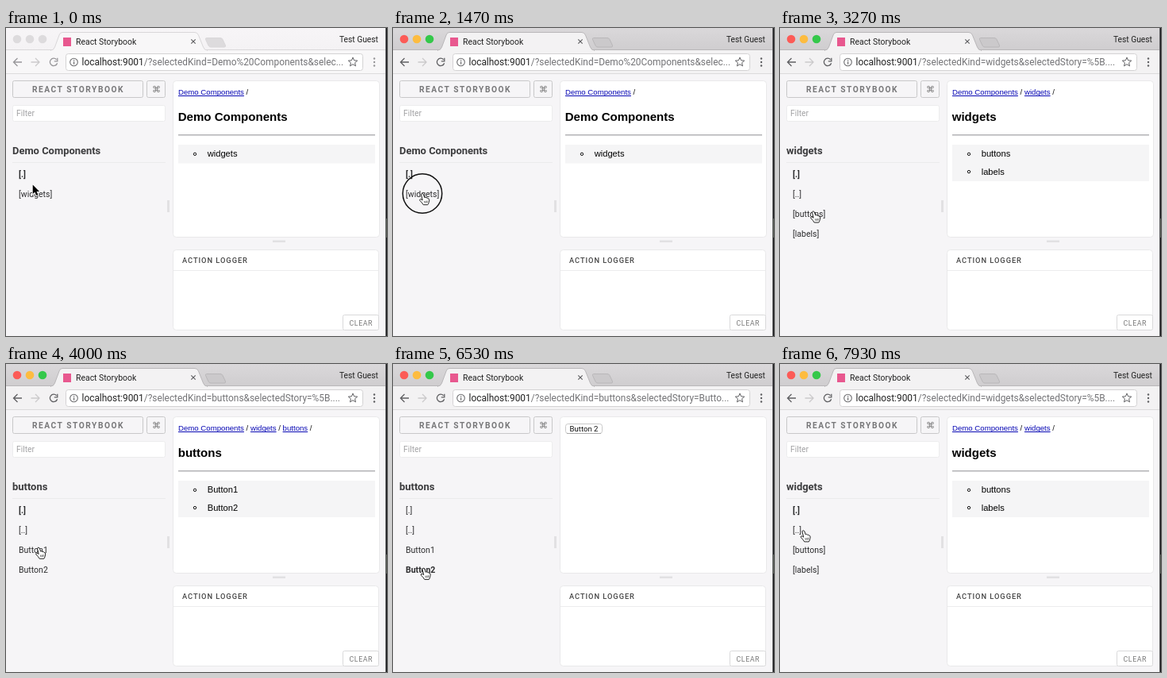
An HTML page with a canvas for the animation above (8000 ms loop, 480 by 388 pixels).

```html
<!DOCTYPE html>
<html lang="en">
<head>
<meta charset="utf-8">
<title>React Storybook</title>
<style>
html, body { margin: 0; width: 480px; height: 388px; overflow: hidden; background: #f6f5f7; }
canvas { display: block; }
</style>
</head>
<body>
<canvas id="stage" width="480" height="388"></canvas>
<script>
const ctx = document.getElementById('stage').getContext('2d');
const LOOP = 8000;
const UI = 'Roboto, "DejaVu Sans", sans-serif';
const DOC = '"Liberation Sans", Arial, sans-serif';
const PATH = '/?selectedKind=';

// Window colours with and without focus
const FOCUS_AT = 70;
const idle = {
  top: '#f7f5f7', low: '#f4f2f4', line: '#d9d7d9', tab: '#f8f7f8',
  plus: '#dddbdd', icon: '#98979a', lights: ['#dddbdd', '#dddbdd', '#dddbdd']
};
const active = {
  top: '#dad8da', low: '#cfcdcf', line: '#b9b7b9', tab: '#f3f2f3',
  plus: '#cbc9cb', icon: '#606063', lights: ['#fc5b57', '#fdbc40', '#34c84a']
};

// Each page: sidebar, selected item, address and preview
const root = {
  title: 'Demo Components', items: ['[.]', '[widgets]'], on: 0,
  url: 'Demo%20Components&selec...', crumbs: ['Demo Components'], list: ['widgets']
};
const widgets = {
  title: 'widgets', items: ['[.]', '[..]', '[buttons]', '[labels]'], on: 0,
  url: 'widgets&selectedStory=%5B....', crumbs: ['Demo Components', 'widgets'], list: ['buttons', 'labels']
};
const buttons = {
  title: 'buttons', items: ['[.]', '[..]', 'Button1', 'Button2'], on: 0,
  url: 'buttons&selectedStory=%5B....', crumbs: ['Demo Components', 'widgets', 'buttons'], list: ['Button1', 'Button2']
};
const story = n => ({ ...buttons, on: n + 1, url: 'buttons&selectedStory=Butto...', button: 'Button ' + n });
const pages = [[0, root], [1670, widgets], [3530, buttons], [4470, story(1)], [6270, story(2)], [7340, widgets]];

const presses = [1470, 3330, 4270, 6070, 7130];
const HOLD = 140;
const moves = [
  [0, 33.7, 197.5], [200, 33.7, 197.5], [870, 37, 208.5], [2330, 37, 208.5], [2730, 42, 230.8],
  [3800, 42, 230.8], [4130, 40.5, 231.2], [5470, 40.5, 231.2], [5870, 38.5, 257.2],
  [6670, 38.5, 257.2], [7000, 29.5, 209.7], [8000, 29.5, 209.7]
];

const arrow = new Path2D('M0 0V11.6L2.7 9.2L4.7 13.6L6.7 12.7L4.8 8.5H8.4Z');
const hand = new Path2D('M-1.6 1Q-.2-1 1.4 1L2.6 5Q4 4 5 5.4Q6.4 4.8 7 6.4Q8.5 6.2 8.7 8L8.2 11Q7.7 13 6.8 14.2H1.2Q-.4 11.4-3 9Q-4 7.5-2.5 7.1Q-1 7.3 .2 8.4Z');
const knuckles = new Path2D('M2.4 9.5L2.9 12M4.3 9.3L4.6 12M6.1 9L6.2 11.8');

function text(s, x, y, size, color, font = UI, weight = 400, gap = 0) {
  ctx.font = `${weight} ${size}px ${font}`;
  ctx.letterSpacing = gap + 'px';
  ctx.fillStyle = color;
  ctx.fillText(s, x, y);
  return x + ctx.measureText(s).width;
}

function rect(x, y, w, h, color) {
  ctx.fillStyle = color;
  ctx.fillRect(x, y, w, h);
}

function box(x, y, w, h, r, fill, stroke) {
  ctx.beginPath();
  ctx.roundRect(x + .5, y + .5, w - 1, h - 1, r);
  ctx.fillStyle = fill;
  ctx.fill();
  ctx.lineWidth = 1;
  ctx.strokeStyle = stroke;
  ctx.stroke();
}

function path(d, stroke, width = 1, fill) {
  const p = new Path2D(d);
  if (fill) { ctx.fillStyle = fill; ctx.fill(p); }
  ctx.strokeStyle = stroke;
  ctx.lineWidth = width;
  ctx.stroke(p);
}

function disc(x, y, r, fill) {
  ctx.beginPath();
  ctx.arc(x, y, r, 0, 7);
  ctx.fillStyle = fill;
  ctx.fill();
}

function ring(x, y, r, color, width) {
  ctx.beginPath();
  ctx.arc(x, y, r, 0, 7);
  ctx.strokeStyle = color;
  ctx.lineWidth = width;
  ctx.stroke();
}

function star(x, y, r, color) {
  ctx.beginPath();
  for (let i = 0; i < 10; i++) {
    const a = i * Math.PI / 5 - Math.PI / 2, d = i % 2 ? r * .45 : r;
    ctx.lineTo(x + d * Math.cos(a), y + d * Math.sin(a));
  }
  ctx.closePath();
  ctx.strokeStyle = color;
  ctx.lineWidth = 1;
  ctx.stroke();
}

function browser(page, look) {
  const strip = ctx.createLinearGradient(0, 0, 0, 28);
  strip.addColorStop(0, look.top);
  strip.addColorStop(1, look.low);
  rect(0, 0, 480, 28, strip);
  rect(0, 27, 480, 1, look.line);
  rect(0, 28, 480, 29, look.tab);
  rect(0, 57, 480, 1, '#dcdbdc');
  path('M56 28.5Q60 28 61.5 24L67 9Q68 5.5 71 5.5H238Q241 5.5 242.5 9L248.5 24Q250 28 254 28.5', look.line, 1, look.tab);
  rect(57, 28, 196, 2, look.tab);
  path('M252.5 12.5H270Q272 12.5 273 14.5L276.5 22Q277 24 275 24H258Q256 24 255 22L251.5 14.5Q251 12.5 252.5 12.5Z', look.line, 1, look.plus);
  look.lights.forEach((c, i) => disc(14 + 16 * i, 14, 5.3, c));
  rect(72, 12, 10, 11, '#e8588f');
  text('React Storybook', 88, 20.5, 10.45, '#222');
  path('M233.3 14.3L238.7 19.7M238.7 14.3L233.3 19.7', '#606063', 1.2);
  text('Test Guest', 420, 18, 10.25, '#222');

  path('M20 43H9.5M14.5 38L9.5 43L14.5 48', look.icon, 1.3);
  path('M31.5 43H42M37 38L42 43L37 48', '#cbcacb', 1.3);
  path('M63.6 39.8A4.7 4.7 0 1 0 64.6 44.2M64.8 37.8V41.8H60.8', look.icon, 1.3);
  box(75, 32, 375, 22, 3, '#fff', '#d4d3d4');
  ring(85.5, 43, 4.8, '#6b6b6e', 1.1);
  rect(85, 42.2, 1.2, 3.6, '#6b6b6e');
  rect(85, 40, 1.2, 1.3, '#6b6b6e');
  const x = text('localhost:9001', 95.5, 46.7, 11.9, '#222');
  text(PATH + page.url, x, 46.7, 11.9, '#737376');
  star(437, 43, 6, '#606063');
  [38.5, 43, 47.5].forEach(y => disc(464, y, 1.2, look.icon));
}

function sidebar(page) {
  box(8, 66, 165, 22, 2, '#f6f5f7', '#c8c8c9');
  text('REACT STORYBOOK', 33, 80.5, 10.2, '#777779', UI, 700, 1.5);
  box(177, 66, 24, 22, 2, '#f6f5f7', '#c8c8c9');
  text('⌘', 184, 81, 11, '#777', '"DejaVu Sans", sans-serif');
  box(8, 97, 193, 21, 2, '#fff', '#ececed');
  text('Filter', 13, 111, 10.3, '#a3a3a5');
  text(page.title, 8, 159.2, 12.95, '#3c3c3e', UI, 700);
  rect(8, 169, 193, 1, '#ebebec');
  page.items.forEach((s, i) => {
    text(s, 16, 187.8 + 24.9 * i, 10.5, '#2c2c2e', UI, i === page.on ? 700 : 400);
  });
  rect(203, 217, 3, 15, '#e2e1e3');
}

function preview(page) {
  box(210, 66, 261, 198, 4, '#fff', '#e9e9ea');
  if (page.button) {
    box(217, 75, 47, 13, 3, '#fff', '#c9c9c9');
    rect(219, 87, 43, 1, '#aaa');
    text(page.button, 222.5, 84.8, 9.6, '#111');
    return;
  }
  let x = 217;
  page.crumbs.forEach(s => {
    const end = text(s, x, 84, 9.65, '#0808b4', DOC);
    rect(x, 85, end - x, 1, '#0808b4');
    x = text(' / ', end, 84, 9.65, '#111', DOC);
  });
  text(page.title, 216.7, 116.6, 15.05, '#000', DOC, 700);
  rect(217, 134, 248, 1.5, '#b3b3b6');
  rect(217, 147, 248, 1 + 22.5 * page.list.length, '#f5f5f6');
  page.list.forEach((s, i) => {
    const y = 158.8 + 22.3 * i;
    ring(238, y, 1.7, '#111', 1);
    text(s, 253.7, y + 3.6, 11.15, '#000', DOC);
  });
}

function logger() {
  rect(336, 267.5, 16, 2.5, '#e2e1e3');
  box(210, 279, 260, 102, 4, '#fff', '#e9e9ea');
  rect(211, 305, 258, 1, '#ececed');
  text('ACTION LOGGER', 222, 295.5, 9.3, '#444', UI, 500, .95);
  box(424, 361, 46, 20, 2, '#fff', '#d9d9da');
  text('CLEAR', 432.5, 374.5, 8.8, '#777', UI, 400, .6);
}

function desktop() {
  rect(478, 0, 1, 388, '#59595c');
  rect(479, 0, 1, 388, '#1c1d1f');
  rect(479, 240, 1, 24, '#5c6259');
}

function place(t) {
  const i = Math.max(1, moves.findIndex(m => m[0] > t));
  const [t0, x0, y0] = moves[i - 1], [t1, x1, y1] = moves[i];
  const k = (t - t0) / (t1 - t0), e = k * k * (3 - 2 * k);
  return [x0 + (x1 - x0) * e, y0 + (y1 - y0) * e];
}

function pointer(t) {
  const [x, y] = place(t);
  if (presses.some(p => t >= p && t < p + HOLD)) ring(x, y, 24.7, '#111', 1.5);
  ctx.save();
  ctx.translate(x, y);
  ctx.lineJoin = 'round';
  if (y < 202) {
    ctx.strokeStyle = '#fff';
    ctx.lineWidth = 1.6;
    ctx.stroke(arrow);
    ctx.fillStyle = '#000';
    ctx.fill(arrow);
  } else {
    ctx.fillStyle = '#fff';
    ctx.fill(hand);
    ctx.strokeStyle = '#222';
    ctx.lineWidth = 1;
    ctx.stroke(hand);
    ctx.lineWidth = .7;
    ctx.stroke(knuckles);
  }
  ctx.restore();
}

function draw(t) {
  const page = pages.filter(p => p[0] <= t).pop()[1];
  rect(0, 0, 480, 388, '#f6f5f7');
  browser(page, t < FOCUS_AT ? idle : active);
  sidebar(page);
  preview(page);
  logger();
  desktop();
  pointer(t);
}

const start = performance.now();
function tick() {
  draw((performance.now() - start) % LOOP);
  requestAnimationFrame(tick);
}
tick();
</script>
</body>
</html>
```
